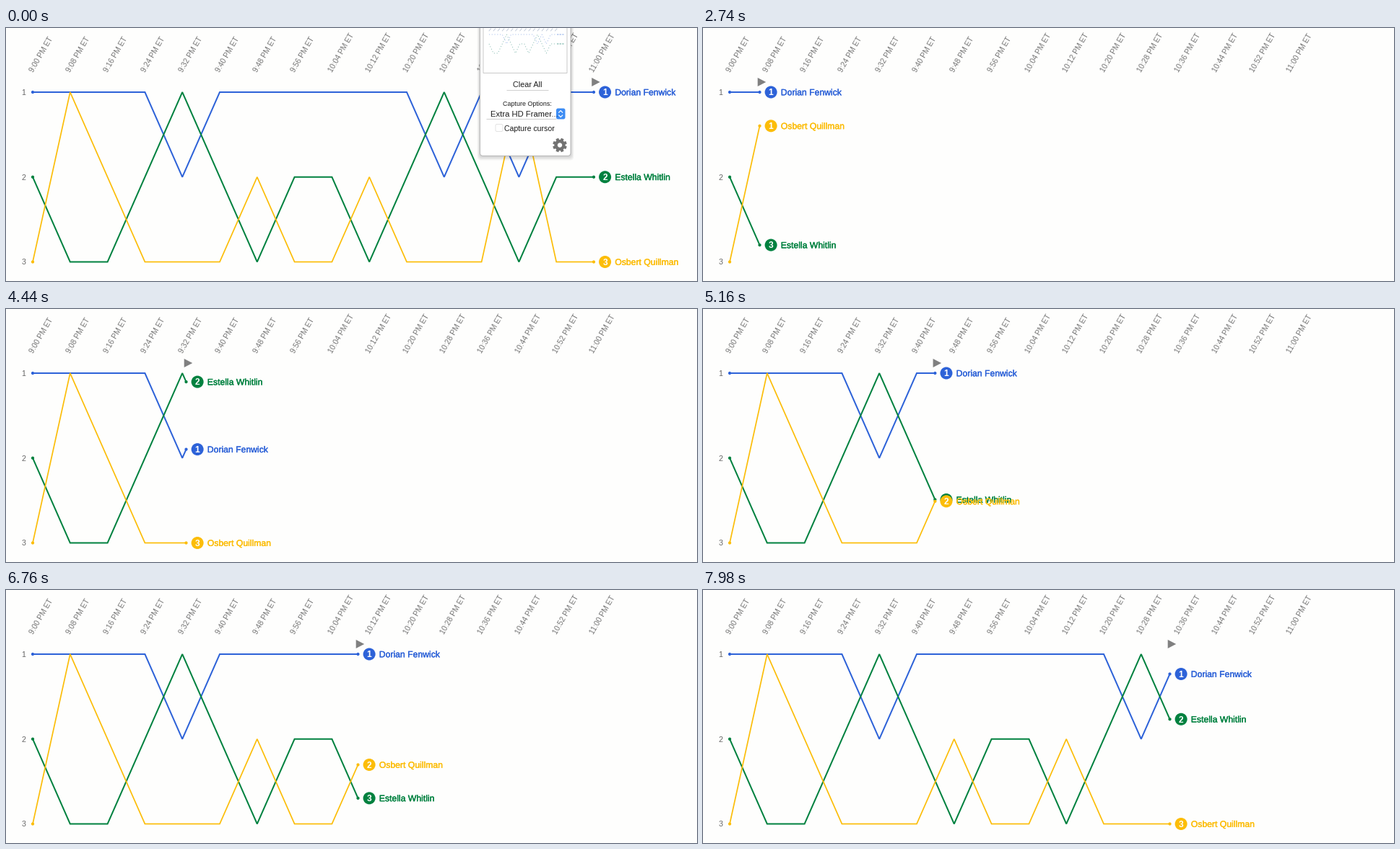
Recreate the animation shown at these times as a matplotlib script. Size 957 by 351 pixels, loop 8 s.

```python
import math

import matplotlib.pyplot as plt
import numpy as np
from matplotlib.animation import FuncAnimation
from matplotlib.patches import Circle, FancyBboxPatch, Polygon, Rectangle
from matplotlib.patheffects import Normal, Stroke

W, H, DPI = 957, 351, 64
PT = 72 / DPI  # points per pixel
STEP_MS, LOOP_MS = 20, 8000

X0, DX, LAST = 37, 51.8, 15
Y1, DY = 89, 117.75
BG, GREY = "#fefefd", "#757575"

POPUP_END, BLANK_START, BLANK_END = 100, 1240, 1960
# Clock (ms) against the x position of the moving front
TIMES = [2400, 2740, 3220, 4860, 5680, 6500, 6760, 7320, 7980]
FRONTS = [37, 78.5, 129, 291, 374, 458, 487.5, 563, 646.5]

RUNNERS = [
    ("Dorian Fenwick", "#2d62d8", 2.0, "1111211111121211"),
    ("Estella Whitlin", "#00813f", 2.0, "2332123223212322"),
    ("Osbert Quillman", "#fcbd08", 1.7, "3123332332333133"),
]

plt.rcParams["font.family"] = "Liberation Sans"
plt.rcParams["path.snap"] = False

fig = plt.figure(figsize=(W / DPI, H / DPI), dpi=DPI, facecolor=BG)


def layer():
    ax = fig.add_axes([0, 0, 1, 1])
    ax.set_xlim(0, W)
    ax.set_ylim(H, 0)
    ax.axis("off")
    return ax


def label(ax, x, y, s, px, color, **kw):
    kw.setdefault("va", "baseline")
    return ax.text(x, y, s, fontsize=px * PT, color=color, **kw)


def rank_y(rank):
    return Y1 + DY * (rank - 1)


class Runner:
    def __init__(self, ax, order, name, color, width, ranks):
        self.ranks = [int(c) for c in ranks]
        self.ys = [rank_y(r) for r in self.ranks]
        z = 10 + 3 * order
        self.line, = ax.plot([], [], color=color, lw=width * PT, zorder=3 + order,
                             solid_joinstyle="miter", solid_capstyle="butt")
        ax.add_patch(Circle((X0, self.ys[0]), 2.1, color=color, lw=0, zorder=7))
        self.dot = ax.add_patch(Circle((X0, 0), 2.1, color=color, lw=0, zorder=7))
        self.badge = ax.add_patch(Circle((X0, 0), 8.5, color=color, lw=0, zorder=z))
        self.digit = label(ax, 0, 0, "", 12, "white", ha="center",
                           weight="bold", zorder=z + 1)
        self.name = label(ax, 0, 0, name, 12.2, color, zorder=z + 1)
        self.name.set_path_effects(
            [Stroke(linewidth=0.35 * PT, foreground=color), Normal()])

    def update(self, x):
        pos = (x - X0) / DX
        done = min(LAST, int(pos + 1e-6))
        ahead = min(LAST, math.ceil(pos - 1e-6))
        y = np.interp(pos, range(LAST + 1), self.ys)
        xs = [X0 + DX * i for i in range(done + 1)]
        self.line.set_data(xs + [x], self.ys[:done + 1] + [y])
        self.dot.set_center((x, y))
        self.badge.set_center((x + 15.6, y))
        self.digit.set_position((x + 15.6, y + 4.3))
        self.digit.set_text(str(self.ranks[ahead]))
        self.name.set_position((x + 29.3, y + 4.3))


def draw_axis(ax):
    for i in range(LAST + 1):
        minutes = 8 * i
        text = f"{9 + minutes // 60}:{minutes % 60:02d} PM ET"
        label(ax, X0 + DX * i + 0.5, 62, text, 10.4, GREY,
              rotation=60, rotation_mode="anchor")
    for rank in (1, 2, 3):
        label(ax, 27, rank_y(rank) + 3.8, str(rank), 10.6, "#666666", ha="right")


def rounded(ax, x, y, w, h, r, color, **kw):
    return ax.add_patch(FancyBboxPatch(
        (x, y), w, h, boxstyle=f"round,pad=0,rounding_size={r}", fc=color, **kw))


def draw_gear(ax, x, y):
    grey = "#727272"
    for k in range(4):
        a = math.pi * (k + 0.5) / 4
        c, s = 9.8 * math.cos(a), 9.8 * math.sin(a)
        ax.plot([x - c, x + c], [y - s, y + s], color=grey, lw=4 * PT,
                solid_capstyle="butt")
    ax.add_patch(Circle((x, y), 7.6, color=grey, lw=0, zorder=4))
    ax.add_patch(Circle((x, y), 3.2, color="white", lw=0, zorder=5))


def draw_thumbnail(ax):
    ax.add_patch(Rectangle((661, -5), 116, 67.5, fc="white", ec="#bdbdbd", lw=0.8 * PT))
    xs = 669 + 6.1 * np.arange(LAST + 1)
    for x in xs:
        ax.plot([x, x + 2.5], [4, 1], color="#b9c4d6", lw=0.8 * PT)
    for (_, _, _, ranks), tint in zip(RUNNERS, ("#9db8ec", "#7fb8ad", None)):
        if tint:
            ys = [9 + 13 * (int(r) - 1) for r in ranks]
            ax.plot(xs, ys, color=tint, lw=0.9 * PT, ls=(0, (1.2, 3)))
            ax.plot([763, 773], [ys[-1]] * 2, color=tint, lw=1.2 * PT, ls=(0, (2, 1)))


def draw_popup(ax):
    for grow in (6, 4.5, 3, 1.5):
        rounded(ax, 657 - grow * 0.7, -20, 125 + grow * 1.4, 197.5 + grow, 5,
                "black", alpha=0.045, lw=0)
    rounded(ax, 656.5, -20, 125.5, 197.3, 4, "white", ec="#b4b4b4", lw=0.9 * PT)
    draw_thumbnail(ax)

    def rule(x1, x2, y):
        ax.plot([x1, x2], [y, y], color="#cfcfcf", lw=1 * PT)

    ink = "#1c1c1c"
    label(ax, 722, 82.5, "Clear All", 10.8, ink, ha="center")
    rule(694, 751, 86.5)
    label(ax, 721.5, 107.5, "Capture Options:", 8.9, ink, ha="center")
    label(ax, 671, 123, "Extra HD Framer...", 11.3, ink)
    rule(666, 762, 126.5)
    rounded(ax, 762, 111.5, 12.5, 15, 2.5, "#3c8cf4", lw=0)
    for y, d in ((117.2, -2.6), (121, 2.6)):
        ax.plot([765.7, 768.2, 770.7], [y, y + d, y], color="white", lw=1.2 * PT)
    rounded(ax, 678, 133.5, 10, 10, 2, "white", ec="#dcdcdc", lw=0.8 * PT)
    label(ax, 690.5, 143, "Capture cursor", 10.5, ink)
    draw_gear(ax, 767, 162.5)


chart = layer()
popup = layer()
draw_axis(chart)
draw_popup(popup)
runners = [Runner(chart, k, *spec) for k, spec in enumerate(RUNNERS)]
pointer = chart.add_patch(Polygon([(0, 0)] * 3, fc="#808080", lw=0, zorder=8))


def update(frame):
    t = frame * STEP_MS
    x = X0 + DX * LAST if t < BLANK_START else np.interp(t, TIMES, FRONTS)
    popup.set_visible(t < POPUP_END)
    chart.set_visible(not BLANK_START <= t < BLANK_END)
    pointer.set_xy([(x - 2.8, 69), (x + 8.7, 75), (x - 2.8, 81)])
    for runner in runners:
        runner.update(x)
    return []


anim = FuncAnimation(fig, update, frames=LOOP_MS // STEP_MS, interval=STEP_MS,
                     init_func=lambda: update(0), repeat=True, repeat_delay=0)
plt.show()
```
